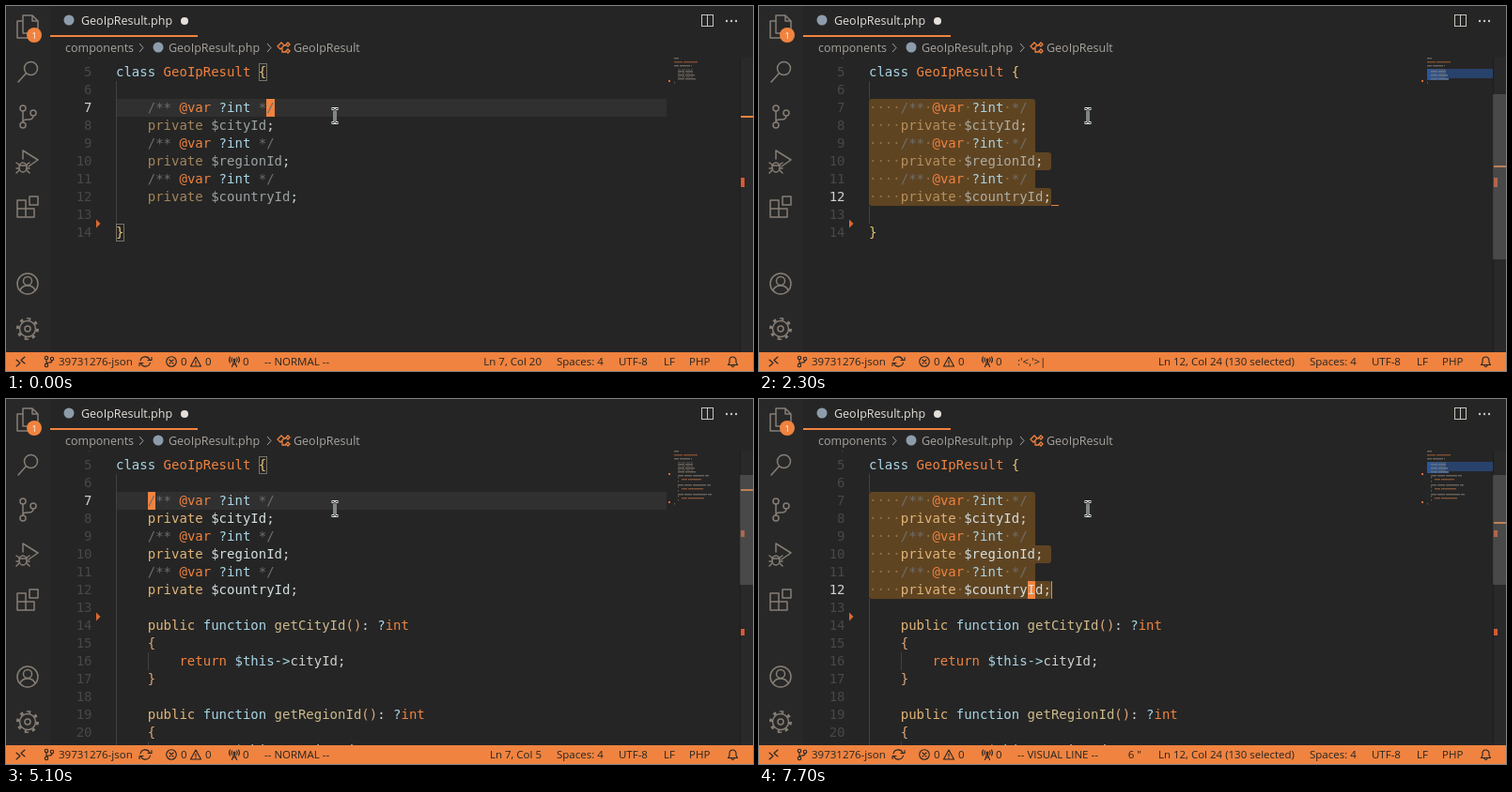
Animation of 795 by 389 pixels, one loop 8 s. Source, as an HTML page with a canvas:

```html
<!DOCTYPE html>
<html lang="en">
<head>
<meta charset="utf-8">
<title>Generating getters in an editor</title>
<style>
  :root { --orange: #f0833f; --bg: #252525; --mono: "DejaVu Sans Mono", monospace; --ui: "Open Sans", sans-serif; }
  html, body { margin: 0; width: 100%; height: 100%; overflow: hidden; background: var(--bg); }
  #stage { position: relative; width: 795px; height: 389px; overflow: hidden; background: var(--bg); }
  #stage > svg, #map { position: absolute; left: 0; top: 0; }
  svg text { font: 12.5px var(--ui); fill: #a8a39e; }
  svg .status text { font-size: 11.5px; fill: #252525; }
  .icons { fill: none; stroke: #867e75; stroke-width: 1.5; stroke-linejoin: round; stroke-linecap: round; }
  .small { fill: none; stroke: #252525; stroke-width: 1.1; stroke-linejoin: round; stroke-linecap: round; }

  #editor { position: absolute; left: 0; top: 55px; width: 795px; height: 314px; overflow: hidden; }
  #editor div { position: absolute; box-sizing: border-box; }
  #editor .text { font: 14px/19px var(--mono); white-space: pre; color: #d0d0cc; height: 19px; }
  #editor .number { color: #484848; width: 40px; left: 51.5px; text-align: right; }
  #editor .number.current { color: #d0d0d0; }
  .highlight { background: #303030; }
  .selection { background: #5f4422; }
  .match { background: #382c23; }
  .guide { background: #424242; }
  .block, .bar, .under { background: var(--orange); }
  .bracket { border: 1px solid #77736a; }
  #editor .dots { color: #8d7146; }
  .note { color: #706d69; }
  .doc { font-style: italic; }
  .tag, .name { color: var(--orange); }
  .kw, .op, .doc .name { color: #a9d5e5; }
  .access { color: #e0b477; }
  .fn { color: #cdb98a; }
  .brace { color: #e7c477; }
  .paren, .inner .brace { color: #dfa679; }
  .variable { color: #d3dfe0; }
  .dim .access, .dim .variable { opacity: .67; }

  .ruler { left: 781px; width: 14px; background: #292929; border-left: 1px solid #1d1d1d; top: 0; height: 314px; }
  .caretmark { background: var(--orange); }
  .diff { background: #d65a32; }
  .slider { background: rgba(121, 121, 121, .4); }

  #mode, #right { position: absolute; top: 369px; font: 11.5px/20px var(--ui); color: #252525; white-space: pre; }
  #mode { left: 275px; }
  #right { right: 225px; display: flex; gap: 18px; }
</style>
</head>
<body>
<div id="stage">
  <div id="editor"></div>
  <canvas id="map" width="795" height="389"></canvas>
  <svg width="795" height="389">
    <rect width="47" height="369" fill="#282828"/>
    <g class="icons">
      <path d="M18 10h10l6 6v13H18zM28 10v6h6M18 16h-6v18h15v-5"/>
      <circle cx="26.500" cy="66.500" r="7"/><path d="M21.500 71.500L13 81"/>
      <circle cx="18" cy="109" r="3"/><circle cx="18" cy="127" r="3"/><circle cx="29" cy="114" r="3"/>
      <path d="M18 112v12M29 117q0 4-5 4h-2q-4 0-4 3"/>
      <path d="M18 163v-9l16 10-10 7"/><ellipse cx="18" cy="172" rx="4" ry="5"/>
      <path d="M14 170h8M11 167l3 2M11 173h3M11 178l3-3M25 167l-3 2M25 173h-3M25 178l-3-3"/>
      <path d="M12 207h9v9h9v9H12zM12 216h9v9"/><rect x="25" y="203" width="9" height="9"/>
      <circle cx="23" cy="296" r="11"/><circle cx="23" cy="293" r="4.500"/><path d="M15 303q2-5 8-5t8 5"/>
      <circle cx="23" cy="344" r="3"/><circle cx="23" cy="344" r="8.500"/>
      <circle cx="23" cy="344" r="10.500" pathLength="80" stroke-width="3" stroke-dasharray="4 6" stroke-linecap="butt"/>
    </g>
    <circle cx="30" cy="31" r="8" fill="#f0833f"/>
    <text x="30" y="34.500" text-anchor="middle" style="font-size:9px;fill:#fff">1</text>

    <rect x="47" y="31" width="157" height="2" fill="#f0833f"/>
    <circle cx="67" cy="15" r="5.500" fill="#8c9cab"/>
    <text x="80" y="20" style="fill:#e4dfd9">GeoIpResult.php</text>
    <circle cx="190" cy="16" r="4" fill="#e4dfd9"/>
    <g fill="none" stroke="#c8c4be"><rect x="740.500" y="9.500" width="12" height="12"/><path d="M746.500 10v11"/></g>
    <g fill="#c8c4be"><circle cx="767" cy="16" r="1.200"/><circle cx="772" cy="16" r="1.200"/><circle cx="777" cy="16" r="1.200"/></g>

    <text x="63" y="49">components</text>
    <path d="M142 40l4 4.500-4 4.500M278 40l4 4.500-4 4.500" fill="none" stroke="#a8a39e"/>
    <circle cx="162" cy="44" r="5.500" fill="#8c9cab"/>
    <text x="173" y="49">GeoIpResult.php</text>
    <path d="M289 43l4-4 3 3-4 4zM295 42h3M294 45v4h4M298 41l2-2 2 2-2 2zM298 48l2-2 2 2-2 2z" fill="none" stroke="#f0833f" stroke-width="1.300"/>
    <text x="306" y="49">GeoIpResult</text>

    <path d="M96 227.500l4.500 4.500-4.500 4.500z" fill="#e0682f"/>
    <g fill="none">
      <path d="M346.500 109.500h2.500l1 1 1-1h2.500M350 110v14M346.500 124.500h2.500l1-1 1 1h2.500" stroke="#dce6ea" stroke-width="3"/>
      <path d="M347 109.500h2l1 1 1-1h2M350 110v14M347 124.500h2l1-1 1 1h2" stroke="#222"/>
    </g>

    <rect y="369" width="795" height="20" fill="#f0833f"/>
    <g class="status">
      <g class="small">
        <path d="M11 377l4 3.500-4 3.500M20 374l-4 3.500 4 3.500"/>
        <circle cx="43" cy="375" r="1.700"/><circle cx="43" cy="383" r="1.700"/><circle cx="49" cy="376" r="1.700"/>
        <path d="M43 377v4M49 378q0 2-3 2t-3 1"/>
        <path d="M143 378a5.300 5.300 0 0 1 10-1M153.500 380a5.300 5.300 0 0 1-10 1M151 377.500h4v-3M146 380.500h-4v3"/>
        <circle cx="176" cy="379" r="5.300"/><path d="M174 377l4 4m0-4l-4 4"/>
        <path d="M202 374l5.500 10h-11zM202 378v3M202 382.500v.2"/>
        <path d="M243 378l-2.500 6.500M243 378l2.500 6.500M241.500 382h3M240.500 375q-1.500 2 0 4M245.500 375q1.500 2 0 4M238.500 374q-2 3 0 6M247.500 374q2 3 0 6"/><circle cx="243" cy="377" r="1"/>
        <path d="M768.500 382.500h10l-1.500-2.500v-2.500a3.500 3.500 0 0 0-7 0v2.500zM772 383.500q1.500 2 3 0"/>
      </g>
      <text x="56" y="383">39731276-json</text>
      <text x="186" y="383">0</text><text x="212" y="383">0</text><text x="252" y="383">0</text>
      <text x="586" y="383">Spaces: 4</text><text x="652" y="383">UTF-8</text>
      <text x="700" y="383">LF</text><text x="727" y="383">PHP</text>
    </g>
  </svg>
  <div id="mode"></div>
  <div id="right"></div>
</div>
<script>
const LOOP = 8000, CHAR = 8.428, ROW = 19, LEFT = 117, FIRST = 7;
const VIEW = 314, SCROLL = 70;

const getter = name => [
  `    public function get${name[0].toUpperCase() + name.slice(1)}(): ?int`,
  '    {', `        return $this->${name};`, '    }', ''];
const fields = ['cityId', 'regionId', 'countryId'];
const head = ['<?php', '', 'namespace app\\components;', '', 'class GeoIpResult {', '',
  ...fields.flatMap(f => ['    /** @var ?int */', `    private $${f};`]), ''];
const before = [...head, '}'];
const after = [...head, ...fields.flatMap(getter), '}'];

// Each step changes part of the state that the earlier ones left behind.
const normal = { mode: '-- NORMAL --', sel: 0, bar: false, under: false, cmd: false, wide: false };
const visual = { mode: '-- VISUAL LINE --', sel: 7, bar: true, bracket: false };
const steps = [
  [0, { ...normal, lines: before, dim: true, bracket: true, block: 20, pos: 'Ln 7, Col 20', extra: '' }],
  [100, { block: 0, slider: true }],
  [600, { ...visual, block: 20 }],
  [800, { same: true }],
  [1000, { sel: 8, same: false, block: 0 }],
  [1200, { sel: 9 }],
  [1300, { sel: 10, block: 21 }],
  [1500, { sel: 11, block: 0 }],
  [1700, { sel: 12, block: 21 }],
  [2200, { bar: false }],
  [2300, { mode: ":'<,'>|", cmd: true, under: true, block: 0 }],
  [2700, { mode: ":'<,'>!|" }],
  [2800, { under: false }],
  [3000, { mode: ":'<,'>!~/scripts/gengetters.awk|", wide: true }],
  [3300, { under: true }],
  [3800, { under: false }],
  [4100, { ...normal, lines: after, block: 5, pos: 'Ln 7, Col 5' }],
  [4200, { bracket: true }],
  [4600, { block: 0 }],
  [4800, { dim: false }],
  [5100, { block: 5 }],
  [5600, { ...visual, block: 5 }],
  [5800, { sel: 8, block: 0 }],
  [6000, { sel: 9 }],
  [6200, { sel: 10, block: 21 }],
  [6400, { sel: 11, block: 0 }],
  [6700, { sel: 12, block: 21 }],
  [7200, { bar: false }],
  [7500, { extra: ' "' }],
  [7700, { bar: true }],
];

const token = /(?<note>\/\*\*|\*\/)|(?<tag>@var)|(?<kw>class|function)|(?<access>public|private)|(?<name>GeoIpResult|return|int\b)|(?<fn>get\w+)|(?<brace>[{}])|(?<paren>[()])|(?<op>->|\?|\$this)|(?<variable>\$\w+)/g;
const escapeHtml = s => s.replace(/</g, '&lt;').replace(/>/g, '&gt;');
const paint = line => line.replace(/</g, '&lt;').replace(token, (...args) => {
  const kind = Object.entries(args.at(-1)).find(([, v]) => v)[0];
  return `<span class="${kind}">${escapeHtml(args[0])}</span>`;
});

const rowTop = n => (n - 1) * ROW - SCROLL;
const colLeft = c => LEFT + (c - 1) * CHAR;
const box = (kind, x, y, w, h, style = '') =>
  `<div class="${kind}" style="left:${x}px;top:${y}px;width:${w}px;height:${h}px;${style}"></div>`;
const label = (kind, y, body, x) =>
  `<div class="text ${kind}" style="top:${y}px;${x ? `left:${x}px` : ''}">${body}</div>`;

function selectionBoxes(s) {
  const width = n => n < FIRST || n > s.sel ? 0 : (s.lines[n - 1].length + (n < s.sel)) * CHAR;
  let html = '';
  for (let n = FIRST; n <= s.sel; n++) {
    const w = width(n), r = on => on ? '3px' : '0';
    html += box('selection', LEFT, rowTop(n), w, ROW,
      `border-radius:${r(n === FIRST)} ${r(width(n - 1) < w)} ${r(width(n + 1) < w)} ${r(n === s.sel)}`);
  }
  return html;
}

function editorHtml(s) {
  const line = s.sel || FIRST, count = s.lines.length;
  let html = s.sel ? selectionBoxes(s) : box('highlight', LEFT, rowTop(FIRST), 586, ROW);
  if (s.same) html += [9, 11].map(n => box('match', LEFT, rowTop(n), 20 * CHAR, ROW)).join('');
  if (s.bracket) html += box('bracket', colLeft(19), rowTop(5), 9, ROW) + box('bracket', LEFT, rowTop(count), 9, ROW);
  if (s.block) html += box('block', colLeft(s.block), rowTop(line), CHAR, ROW);

  s.lines.forEach((body, i) => {
    const n = i + 1, y = rowTop(n), selected = s.sel && n >= FIRST && n <= s.sel;
    if (n > 5 && n < count && !selected) html += box('guide', LEFT, y, 1, ROW);
    if (body.startsWith('        ')) html += box('guide', colLeft(5), y, 1, ROW);
    const kind = (body.includes('/**') ? 'doc ' : '') + (body.startsWith('    ') ? 'inner ' : '') + (s.dim && n < 13 ? 'dim' : '');
    html += label('number' + (n === line ? ' current' : ''), y, n);
    if (selected) html += label('dots', y, body.replace(/\S/g, '_').replace(/ /g, '·').replace(/_/g, ' '), LEFT);
    html += label(kind, y, paint(body), LEFT);
  });
  if (s.bar) html += box('bar', colLeft(s.lines[line - 1].length + 1), rowTop(line), 1.5, ROW);
  if (s.under) html += box('under', colLeft(24), rowTop(13) - 1, CHAR, 1);

  // Overview ruler: the file plus the space to scroll past its last line.
  const scale = VIEW / ((count - 1) * ROW + VIEW);
  const ruler = n => (n - 1) * ROW * scale;
  html += '<div class="ruler"></div>' + box('caretmark', 782, Math.floor(ruler(line)) - 1, 13, 2);
  for (const n of [13, 28]) if (n < count) html += box('diff', 782, ruler(n), 4, ROW * scale);
  if (s.slider) html += box('slider', 781, SCROLL * scale, 14, VIEW * scale);
  return html;
}

function drawMinimap(s) {
  const g = document.getElementById('map').getContext('2d');
  const fill = (color, ...r) => { g.fillStyle = color; g.fillRect(...r); };
  g.clearRect(0, 0, 795, 389);
  s.lines.forEach((body, i) => {
    const n = i + 1, y = 55 + i * 2;
    if (s.sel && n >= FIRST && n <= s.sel) {
      if (n < s.sel) fill('#28426b', 711, y, 70, 2);
      fill('#2b579a', 711, y, body.length, 2);
    }
    const color = n === 3 ? '#a65f36' : body.includes('/**') ? '#59534d' : body.includes('return') ? '#a3653f' : '#827c72';
    for (const word of body.matchAll(/\S+/g)) fill(color, 711 + word.index, y + .3, word[0].length, 1);
  });
  for (const n of [13, 28]) if (n < s.lines.length) fill('#d96a35', 705, 53 + n * 2, 2, 2);
}

function positionText(s) {
  if (!s.sel) return s.pos;
  const chosen = s.lines.slice(FIRST - 1, s.sel).join('\n').length;
  return `Ln ${s.sel}, Col ${s.lines[s.sel - 1].length + 1} (${chosen} selected)`;
}

function render(s) {
  document.getElementById('editor').innerHTML = editorHtml(s);
  document.getElementById('mode').textContent = s.mode;
  const count = s.sel && !s.cmd ? `<span>${s.sel - FIRST + 1}${s.extra}</span>` : '';
  document.getElementById('right').innerHTML = s.wide ? '' : `${count}<span>${positionText(s)}</span>`;
  drawMinimap(s);
}

let shown = -1;
function tick() {
  const time = performance.now() % LOOP;
  const index = steps.findLastIndex(([start]) => start <= time);
  if (index !== shown) {
    shown = index;
    render(Object.assign({}, ...steps.slice(0, index + 1).map(([, change]) => change)));
  }
  requestAnimationFrame(tick);
}
tick();
</script>
</body>
</html>
```
